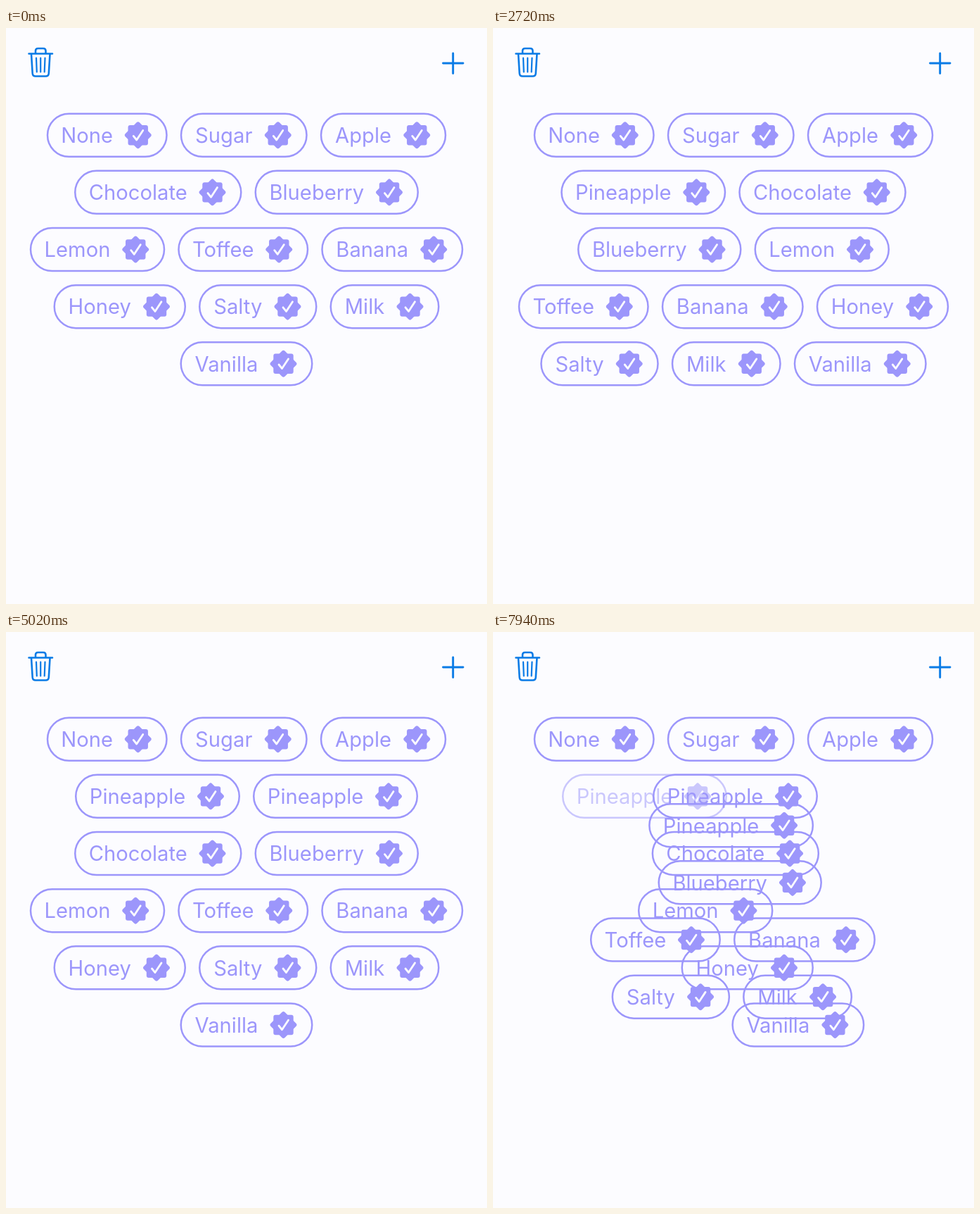
An HTML page for the animation above (8 s loop, 684x818 px).

```html
<!DOCTYPE html>
<html lang="en">
<head>
<meta charset="utf-8">
<title>Flavour tags</title>
<style>
  html, body { margin: 0; width: 100%; height: 100%; overflow: hidden; background: #fcfcff; }
  svg { display: block; width: 100%; height: 100%; }
  text {
    font: 400 29.2px Inter, "Liberation Sans", sans-serif;
    font-optical-sizing: none;
    text-anchor: middle;
    fill: #9c96fb;
  }
  .icon, .pill, .check { fill: none; stroke-linecap: round; stroke-linejoin: round; }
  .icon { stroke: #0a7be6; stroke-width: 2.6; }
  .pill { stroke: #9c96fb; stroke-width: 2.5; }
  .seal { fill: #9c96fb; }
  .check { stroke: #fcfcff; stroke-width: 2.8; }
</style>
</head>
<body>
<svg viewBox="0 0 684 818">
  <defs>
    <g id="badge">
      <rect class="seal" x="-14.2" y="-14.2" width="28.4" height="28.4" rx="3"/>
      <rect class="seal" x="-14.2" y="-14.2" width="28.4" height="28.4" rx="3" transform="rotate(45)"/>
      <path class="check" d="M-6.5 1.2L-2 6.8L7-6.8"/>
    </g>
  </defs>
  <g class="icon">
    <path d="M32.5 36.5H66M42 36V32.5Q42 29 45.5 29H53Q56.5 29 56.5 32.5V36"/>
    <path d="M36 37L37.7 64.5Q38 68.5 42 68.5H56.5Q60.5 68.5 60.8 64.5L62.5 37"/>
    <path d="M43 42.5L43.8 62.5M49.2 42.5V62.5M55.5 42.5L54.7 62.5" stroke-width="2.2"/>
    <path d="M621.5 50H650M635.7 36V64.5" stroke-width="2.9"/>
  </g>
  <g id="tags"></g>
</svg>
<script>
const LOOP = 8000, MOVE = 350;
const MID = 342, MAX_ROW = 640, GAP = 18, TOP = 152.2, ROW = 81.15;

const widths = {
  None: 172, Sugar: 181, Apple: 179.5, Chocolate: 238.5, Blueberry: 233.5,
  Lemon: 192.5, Toffee: 186, Banana: 202, Honey: 188.5, Salty: 168.5,
  Milk: 156, Vanilla: 189, Pineapple: 235
};

const tags = [];
const layer = document.getElementById("tags");

function addTag(name) {
  const w = widths[name];
  const node = document.createElementNS("http://www.w3.org/2000/svg", "g");
  node.innerHTML =
    `<rect class="pill" x="1.25" y="-30.5" width="${w - 2.5}" height="61" rx="30.5"/>` +
    `<text x="${(w - 57) / 2}" y="10.8">${name}</text>` +
    `<use href="#badge" x="${w - 42}"/>`;
  layer.append(node);
  const tag = { w, node };
  tags.push(tag);
  return tag;
}

// Wraps a list into centred rows and maps each tag to its place.
function layout(list) {
  const rows = [];
  let row;
  for (const tag of list) {
    if (!row || row.width + GAP + tag.w > MAX_ROW) {
      row = { width: -GAP, items: [] };
      rows.push(row);
    }
    row.items.push(tag);
    row.width += GAP + tag.w;
  }
  const places = new Map();
  rows.forEach(({ width, items }, i) => {
    let x = MID - width / 2;
    for (const tag of items) {
      places.set(tag, { x, y: TOP + ROW * i });
      x += tag.w + GAP;
    }
  });
  return places;
}

const base = Object.keys(widths).slice(0, -1).map(addTag);
const [p1, p2, p3] = [1, 2, 3].map(() => addTag("Pineapple"));
const withExtra = (...extra) => layout([...base.slice(0, 3), ...extra, ...base.slice(3)]);

const steps = [
  { at: -MOVE, places: withExtra() },
  { at: 1917, places: withExtra(p1) },
  { at: 4123, places: withExtra(p2, p1) },
  { at: 5540, places: withExtra(p3, p2, p1) },
  { at: 7767, places: withExtra(p2, p1) }
];

// Spans where the picture stands still.
const holds = [[1970, 2070], [7940, LOOP]];

// Ease-in-out: cubic Bezier (.42, 0, .58, 1).
function ease(x) {
  if (x <= 0) return 0;
  if (x >= 1) return 1;
  let lo = 0, hi = 1, s = x;
  for (let i = 0; i < 24; i++) {
    s = (lo + hi) / 2;
    const bx = 3 * s * (1 - s) * ((1 - s) * 0.42 + s * 0.58) + s ** 3;
    if (bx < x) lo = s; else hi = s;
  }
  return s * s * (3 - 2 * s);
}

function render(time) {
  const hold = holds.find(([a, b]) => time >= a && time < b);
  const t = hold ? hold[0] : time;
  let i = steps.length - 1;
  while (i > 0 && steps[i].at > t) i--;
  const from = steps[Math.max(0, i - 1)].places;
  const to = steps[i].places;
  const p = ease((t - steps[i].at) / MOVE);
  for (const tag of tags) {
    const a = from.get(tag) || to.get(tag);
    const b = to.get(tag) || a;
    const alpha = (from.has(tag) ? 1 - p : 0) + (to.has(tag) ? p : 0);
    tag.node.setAttribute("opacity", a ? alpha : 0);
    if (a) {
      const x = a.x + (b.x - a.x) * p, y = a.y + (b.y - a.y) * p;
      tag.node.setAttribute("transform", `translate(${x.toFixed(2)} ${y.toFixed(2)})`);
    }
  }
}

const start = performance.now();
function tick() {
  render((performance.now() - start) % LOOP);
  requestAnimationFrame(tick);
}
tick();
</script>
</body>
</html>
```
